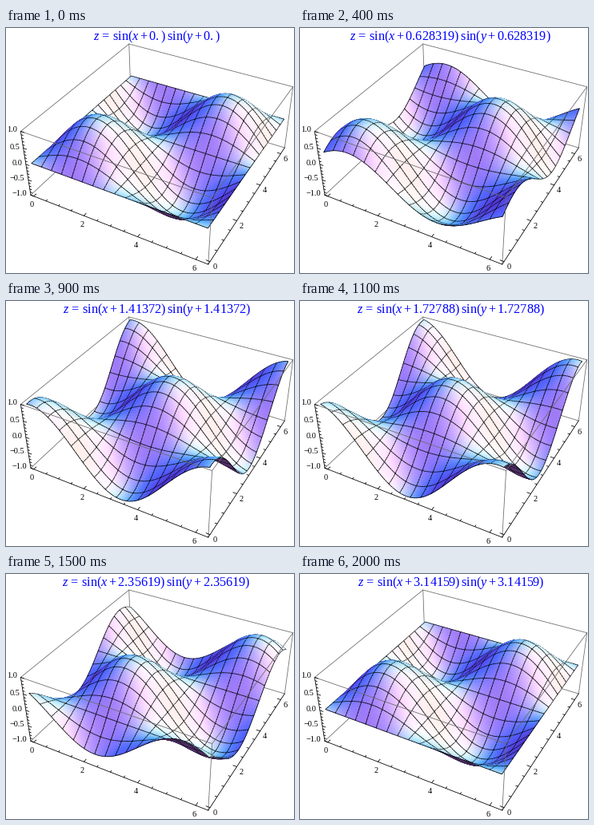
These frames come from a looping animation (360 by 307 pixels, 2100 ms). A matplotlib script:

```python
import numpy as np
import matplotlib.pyplot as plt
from matplotlib.animation import FuncAnimation
from matplotlib.collections import LineCollection, PolyCollection

W, H, DPI = 360, 307, 64
PX = 72 / DPI                      # points per pixel
FRAMES, INTERVAL = 21, 100
MESH, SUB = 16, 6                  # mesh cells per side, patches per cell
N = MESH * SUB
HALF, ZH = 0.5, 0.2                # half sizes of the box
SPAN = HALF / 1.04                 # half width of the surface inside it
SLOPE = ZH * np.pi / SPAN

plt.rcParams.update({
    "font.family": "Liberation Serif",
    "mathtext.fontset": "custom",
    "mathtext.rm": "Liberation Serif",
    "mathtext.it": "Liberation Serif:italic",
})

# Camera: perspective view aimed at the centre of the box
EYE = np.array([1.3, -2.4, 2.0])
DIST = np.linalg.norm(EYE)
BACK = EYE / DIST
RIGHT = np.cross([0, 0, 1], BACK)
RIGHT /= np.linalg.norm(RIGHT)
UP = np.cross(BACK, RIGHT)
VIEW = np.array([RIGHT, UP, BACK])
SCALE, CX, CY = 818, 197.0, 140.6

# Lights in view space
AMBIENT = np.array([0.312, 0.188, 0.4])
LIGHTS = np.array([[1, 0, 1], [1, 1, 1], [0, 1, 1]], float)
LIGHTS /= np.linalg.norm(LIGHTS, axis=1, keepdims=True)


def project(p):
    v = np.asarray(p, float) @ VIEW.T
    k = SCALE / (DIST - v[..., 2])
    return np.stack([CX + v[..., 0] * k, CY - v[..., 1] * k], -1)


def to_box(t):
    return SPAN * (t - np.pi) / np.pi


def height(x, y, phase):
    return ZH * np.sin(x + phase) * np.sin(y + phase)


def shade(x, y, phase):
    sx, cx = np.sin(x + phase), np.cos(x + phase)
    sy, cy = np.sin(y + phase), np.cos(y + phase)
    n = np.stack([-SLOPE * cx * sy, -SLOPE * sx * cy, np.ones_like(x)], -1)
    n /= np.linalg.norm(n, axis=-1, keepdims=True)
    p = np.stack([to_box(x), to_box(y), ZH * sx * sy], -1)
    away = np.sum(n * (EYE - p), -1) < 0
    n[away] *= -1
    lit = np.clip(n @ VIEW.T @ LIGHTS.T, 0, None)
    return np.clip(AMBIENT + 0.8 * lit, 0, 1)


def paint_order():
    """Patches and mesh segments from back to front, as vertex indices."""
    items, patch = [], []
    for j in reversed(range(N)):
        for i in range(N):
            a = j * (N + 1) + i
            b, d = a + 1, a + N + 1
            c = d + 1
            items.append((a, b, c, d))
            patch.append(j * N + i)
            sides = [(i % SUB == 0, a, d), (i == N - 1, b, c),
                     ((j + 1) % SUB == 0, d, c), (j == 0, a, b)]
            for on, p, q in sides:
                if on:
                    items.append((p, q, q, p))
                    patch.append(-1)
    return np.array(items), np.array(patch)


fig = plt.figure(figsize=(W / DPI, H / DPI), dpi=DPI, facecolor="white")
ax = fig.add_axes([0, 0, 1, 1])
ax.set_xlim(0, W)
ax.set_ylim(H, 0)
ax.axis("off")


def add_lines(segments, color, width, z):
    ax.add_collection(LineCollection(
        [project(s) for s in segments], colors=color,
        linewidths=width * PX, zorder=z, capstyle="round"))


def corner(sx, sy, sz):
    return (sx * HALF, sy * HALF, sz * ZH)


def edges(*pairs):
    return [(corner(*p), corner(*q)) for p, q in pairs]


A, B, C, D = (-1, -1, -1), (1, -1, -1), (1, 1, -1), (-1, 1, -1)
A1, B1, C1, D1 = [(x, y, 1) for x, y, _ in (A, B, C, D)]
GRAY = "0.42"
add_lines(edges((A, D), (D, C), (D, D1), (A1, D1), (D1, C1), (C, C1)),
          GRAY, 0.8, 1)
add_lines(edges((A1, B1), (B1, C1), (B, B1)), GRAY, 0.8, 3)
add_lines(edges((A, B), (B, C), (A, A1)), "black", 0.8, 4)


def add_axis(values, major, point, inward, offset, fmt, ha):
    ticks = []
    for v in values:
        big = abs(v / major - round(v / major)) < 1e-6
        p = np.array(point(v))
        ticks.append((p, p + np.array(inward) * (0.02 if big else 0.011)))
        if big:
            x, y = project(p) + offset
            label = fmt.format(v + 0.0).replace("-", "\u2212")
            ax.text(x, y, label, size=10.3 * PX, ha=ha,
                    va="center_baseline", zorder=5)
    add_lines(ticks, "black", 0.8, 4)


steps = np.arange(13) / 2
add_axis(steps, 2, lambda v: (to_box(v), -HALF, -ZH), (0, 1, 0),
         (-2.5, 10), "{:.0f}", "center")
add_axis(steps, 2, lambda v: (HALF, to_box(v), -ZH), (-1, 0, 0),
         (6, 6), "{:.0f}", "center")
add_axis(np.arange(-10, 11) / 10, 0.5, lambda v: (-HALF, -HALF, v * ZH),
         (1, 0, 0), (-4.5, -2.5), "{:.1f}", "right")

grid = np.linspace(0, 2 * np.pi, N + 1)
VX, VY = [g.ravel() for g in np.meshgrid(grid, grid)]
mid = (grid[1:] + grid[:-1]) / 2
MX, MY = [g.ravel() for g in np.meshgrid(mid, mid)]
ITEMS, PATCH = paint_order()
IS_LINE = PATCH < 0

surface = PolyCollection(
    np.zeros((1, 4, 2)), zorder=2, joinstyle="round",
    linewidths=np.where(IS_LINE, 0.85, 0.5) * PX)
ax.add_collection(surface)
title = ax.text(188, 15.3, "", color="blue", size=16.3 * PX,
                ha="center", va="baseline", zorder=6)


def draw(k):
    phase = k * np.pi / 20
    points = project(np.stack(
        [to_box(VX), to_box(VY), height(VX, VY, phase)], -1))
    colors = shade(MX, MY, phase)[PATCH]
    colors[IS_LINE] = 0
    surface.set_verts(points[ITEMS])
    surface.set_facecolor(colors)
    surface.set_edgecolor(colors)
    num = f"{phase:.6g}" if k else "0."
    title.set_text(rf"$z\,=\,\sin(x+{num})\:\sin(y+{num})$")
    return surface, title


anim = FuncAnimation(fig, draw, frames=FRAMES, interval=INTERVAL,
                     init_func=lambda: draw(0), repeat=True, repeat_delay=0)
plt.show()
```
